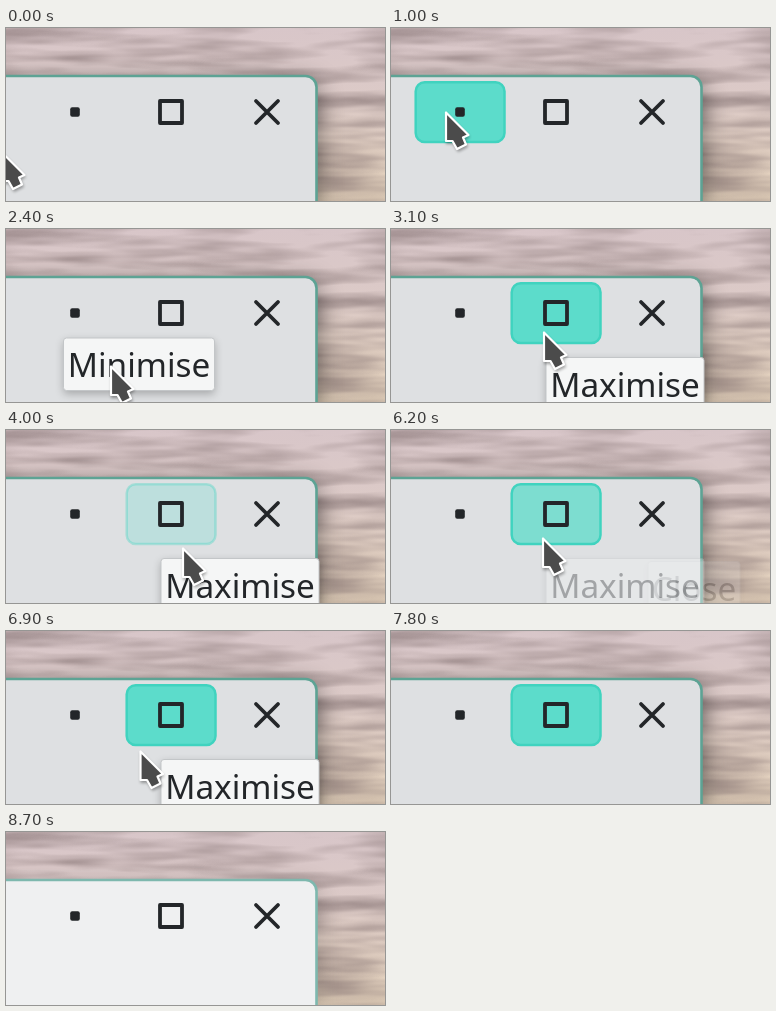
Animation of 379x173 px, one loop 8800 ms. Source, as an HTML page:

```html
<!DOCTYPE html>
<html lang="en">
<head>
<meta charset="utf-8">
<title>Title bar buttons</title>
<style>
html, body { margin: 0; width: 100%; height: 100%; overflow: hidden; }
svg { display: block; width: 379px; height: 173px; }
text { font: 33.33px "Noto Sans", sans-serif; fill: #232629; text-anchor: middle; }
.tip rect { fill: #f5f6f6; stroke: #c3c6c8; stroke-width: 1; }
.tip .shade { fill: #000; stroke: none; opacity: .25; }
.hover { fill: #5cdccb; stroke: #40d3bf; stroke-width: 2.5; }
.danger { fill: #e06d7b; stroke: #dc2f44; }
.icon { fill: none; stroke: #232629; stroke-width: 3.8; stroke-linejoin: round; }
</style>
</head>
<body>
<svg viewBox="0 0 379 173">
  <defs>
    <linearGradient id="sky" x1="0" y1="0" x2="0" y2="1">
      <stop offset="0" stop-color="#d8c6c9"/>
      <stop offset=".4" stop-color="#dccac7"/>
      <stop offset="1" stop-color="#e8d6be"/>
    </linearGradient>
    <filter id="streaks" x="0" y="0" width="100%" height="100%" color-interpolation-filters="sRGB">
      <feTurbulence type="fractalNoise" baseFrequency=".008 .06" numOctaves="3" seed="4"/>
      <feColorMatrix values="0 0 0 0 .5  0 0 0 0 .43  0 0 0 0 .43  1.3 0 0 0 -.45"/>
    </filter>
    <filter id="soft" x="-30%" y="-30%" width="160%" height="160%"><feGaussianBlur stdDeviation="13"/></filter>
    <filter id="near" x="-20%" y="-30%" width="140%" height="160%"><feGaussianBlur stdDeviation="4"/></filter>
    <filter id="tiny" x="-30%" y="-30%" width="160%" height="160%"><feGaussianBlur stdDeviation="1.5"/></filter>
  </defs>

  <rect width="379" height="173" fill="url(#sky)"/>
  <rect width="379" height="173" filter="url(#streaks)"/>
  <rect id="shadow" x="-90" y="54" width="401" height="220" rx="12" filter="url(#soft)"/>
  <rect id="win" x="-20" y="48" width="330.5" height="160" rx="11" stroke-width="2.6"/>

  <g id="hovers"></g>
  <rect x="64.200" y="79.200" width="9.600" height="9.600" rx="2" fill="#232629"/>
  <rect class="icon" x="154" y="73" width="22" height="22"/>
  <path id="cross" class="icon" stroke-linecap="round" d="M250 73l22 22m0-22l-22 22"/>
  <g id="tips"></g>
  <g id="cursor">
    <path d="M0 0V31H7L12 39L22 34L19 27L24 24Z" opacity=".35" filter="url(#tiny)" transform="translate(1 2)"/>
    <path d="M1 1.500V30H7.500L12 38L21 33.500L18 26.500L23.500 24Z" fill="#4b4b4b" stroke="#fff" stroke-width="2.200" stroke-linejoin="round"/>
  </g>
</svg>
<script>
const LOOP = 8800, STEP = 100;
const HOVER_FADE = 300, TIP_FADE = 200;
const $ = id => document.getElementById(id);
const NS = "http://www.w3.org/2000/svg";

// Steps at which the picture holds still
const held = [4700, 6300, 7500, 7700, 7900, 8000];

// Pointer moves: start, end, x and y reached
const moves = [
  [500, 1000, 54, 83], [2000, 2400, 104, 136], [2700, 3100, 152, 102],
  [3700, 4000, 176, 117], [4000, 4300, 212, 133], [4400, 4600, 254, 105],
  [5600, 5900, 153, 130], [6000, 6200, 151, 107], [6700, 7100, 116, 131],
  [7200, 7400, 15, 140], [7400, 7800, -57, 108]
];

// Each button with the times its highlight and tooltip come and go
const buttons = [
  { text: "Minimise", tip: [57.5, 109, 151], hover: [[700, 2100]], label: [[1500, 2700]] },
  { text: "Maximise", tip: [155, 128.5, 158], hover: [[2800, 3800], [6000, 7800]],
    label: [[2800, 4400], [6125, 7200]] },
  { text: "Close", tip: [257, 131.5, 92], hover: [[4400, 5600]], label: [[4400, 6050]] }
];

const ramp = (t, a, b) => Math.max(0, Math.min(1, (t - a) / (b - a)));
const smooth = k => k * k * (3 - 2 * k);

function shown(periods, t, fade) {
  return Math.max(...periods.map(([on, off]) =>
    smooth(ramp(t, on, on + fade)) - smooth(ramp(t, off, off + fade))));
}

function mix(a, b, k) {
  return `rgb(${a.map((v, i) => Math.round(v + (b[i] - v) * k))})`;
}

function make(tag, attrs, parent) {
  const el = document.createElementNS(NS, tag);
  for (const k in attrs) el.setAttribute(k, attrs[k]);
  return parent.appendChild(el);
}

buttons.forEach((b, i) => {
  b.box = make("rect", { class: b.text === "Close" ? "hover danger" : "hover",
    x: 24.7 + 96 * i, y: 54.2, width: 88.8, height: 59.8, rx: 9 }, $("hovers"));
  const [x, y, width] = b.tip;
  b.note = make("g", { class: "tip" }, $("tips"));
  make("rect", { class: "shade", x, y: y + 3, width, height: 53, rx: 3, filter: "url(#near)" }, b.note);
  make("rect", { x, y, width, height: 52.5, rx: 3 }, b.note);
  make("text", { x: x + width / 2, y: y + 39 }, b.note).textContent = b.text;
});
// The tooltip of Maximise lies over that of Close
$("tips").append(buttons[1].note);

function draw(time) {
  let t = Math.floor(time / STEP) * STEP;
  while (held.includes(t)) t -= STEP;

  for (const b of buttons) {
    b.level = shown(b.hover, t, HOVER_FADE);
    b.box.setAttribute("fill-opacity", b.level);
    b.box.setAttribute("stroke-opacity", Math.min(1, b.level * 1.35));
    b.note.setAttribute("opacity", shown(b.label, t, TIP_FADE));
  }
  $("cross").style.stroke = mix([35, 38, 41], [255, 255, 255], buttons[2].level);

  let x = -5, y = 123;
  for (const [from, to, toX, toY] of moves) {
    const k = ramp(t, from, to);
    x += (toX - x) * k;
    y += (toY - y) * k;
  }
  $("cursor").setAttribute("transform", `translate(${x} ${y})`);

  const idle = ramp(t, 8500, 8700);
  $("win").setAttribute("fill", mix([222, 224, 226], [239, 240, 241], idle));
  $("win").setAttribute("stroke", mix([93, 163, 148], [126, 184, 174], idle));
  $("shadow").setAttribute("opacity", .5 - .28 * idle);
}

function tick() {
  draw(performance.now() % LOOP);
  requestAnimationFrame(tick);
}
tick();
</script>
</body>
</html>
```
